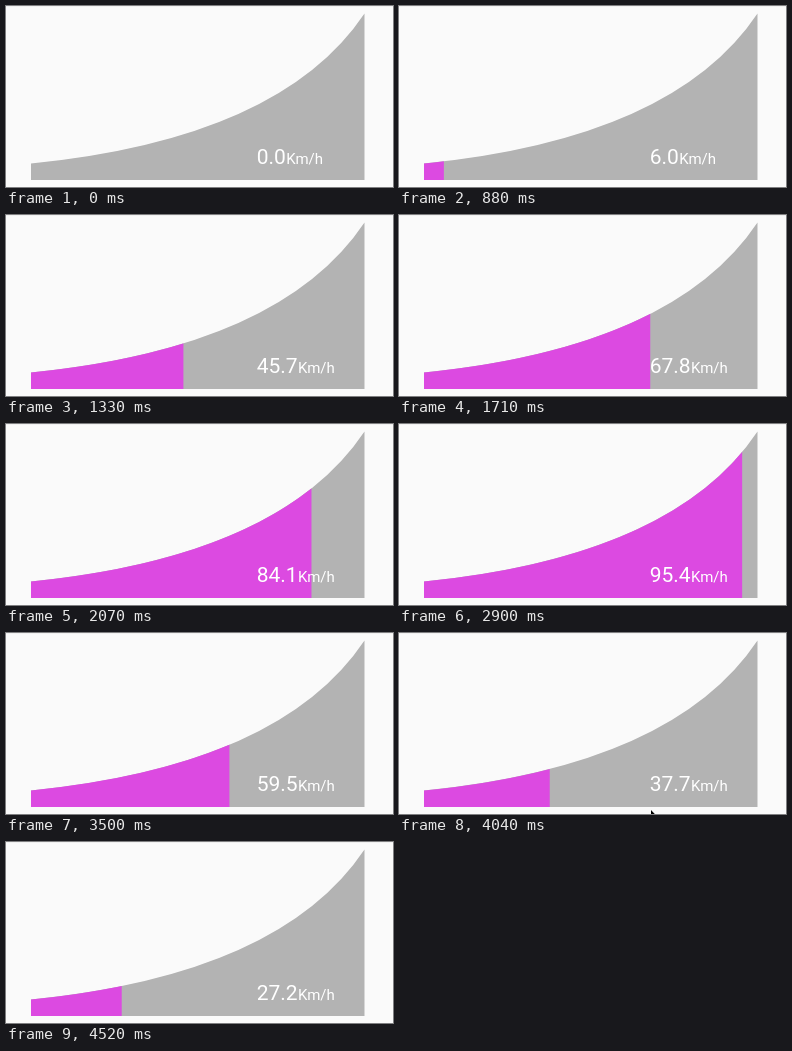
These frames come from a looping animation (387x181 px, 4.56 s). An HTML page with a canvas:

```html
<!DOCTYPE html>
<html lang="en">
<head>
<meta charset="utf-8">
<title>Speed gauge</title>
<style>
  html, body { margin: 0; width: 100%; height: 100%; overflow: hidden; background: #fafafa; }
  canvas { display: block; }
</style>
</head>
<body>
<canvas id="stage" width="387" height="181"></canvas>
<script>
const ctx = document.getElementById('stage').getContext('2d');
const LOOP = 4560;
const LEFT = 25, RIGHT = 358.5, BOTTOM = 174;

// Speed over time: [ms, km/h]
const KEYS = [
  [820, 0], [1080, 25.4], [1330, 45.7], [1950, 79.9], [2070, 84.1], [2370, 91.4],
  [2900, 95.4], [3020, 89.7], [3500, 59.5], [4040, 37.7], [4520, 27.2]
];

// Bursts of display updates: [first, last, count]
const BURSTS = [
  [880, 1390, 10], [1450, 1950, 9], [2010, 2370, 7], [2530, 3020, 9],
  [3080, 3560, 9], [3620, 4100, 9], [4160, 4520, 7]
];
const TICKS = BURSTS.flatMap(([a, b, n]) =>
  Array.from({ length: n }, (_, i) => Math.round((a + (b - a) * i / (n - 1)) / 10) * 10));

const slopes = KEYS.slice(1).map(([t, v], i) => (v - KEYS[i][1]) / (t - KEYS[i][0]));
const tangents = KEYS.map((_, i) => {
  if (i === 0) return slopes[0];
  if (i === slopes.length) return slopes[i - 1];
  const a = slopes[i - 1], b = slopes[i];
  return a * b > 0 ? 2 * a * b / (a + b) : 0;
});

// Monotone cubic interpolation between the keys
function speedAt(t) {
  if (t <= KEYS[0][0]) return 0;
  let i = 0;
  while (i < KEYS.length - 2 && t > KEYS[i + 1][0]) i++;
  const [t0, v0] = KEYS[i], [t1, v1] = KEYS[i + 1];
  const h = t1 - t0, u = (t - t0) / h, w = 1 - u;
  return v0 * (1 + 2 * u) * w * w + v1 * u * u * (3 - 2 * u)
    + h * u * w * (tangents[i] * w - tangents[i + 1] * u);
}

const ramp = new Path2D();
ramp.moveTo(LEFT, BOTTOM);
ramp.lineTo(LEFT, 157.5);
ramp.quadraticCurveTo(275, 132.5, RIGHT, 7.5);
ramp.lineTo(RIGHT, BOTTOM);
ramp.closePath();

const arrow = new Path2D('M0 0V13L3 10L5 15L7 14L5 9.5H9Z');

function drawRamp(speed) {
  ctx.fillStyle = '#b3b3b3';
  ctx.fill(ramp);
  if (speed <= 0) return;
  ctx.save();
  ctx.beginPath();
  ctx.rect(0, 0, LEFT + (RIGHT - LEFT) * speed / 100, 181);
  ctx.clip();
  ctx.fillStyle = '#dc4ae1';
  ctx.fill(ramp);
  ctx.restore();
}

function drawLabel(speed) {
  const digits = speed.toFixed(1);
  ctx.fillStyle = '#fff';
  ctx.font = '21px Roboto, sans-serif';
  ctx.fillText(digits, 250.7, 158);
  const x = 251 + ctx.measureText(digits).width;
  ctx.font = '15px Roboto, sans-serif';
  ctx.fillText('Km/h', x, 158);
}

function drawPointer(t) {
  if (t < 4040 || t >= 4280) return;
  ctx.save();
  ctx.translate(252 + (t - 4040) * 0.35, 177);
  ctx.strokeStyle = '#fff';
  ctx.lineWidth = 1;
  ctx.stroke(arrow);
  ctx.fillStyle = '#000';
  ctx.fill(arrow);
  ctx.restore();
}

function draw(now) {
  const t = now % LOOP;
  const tick = TICKS.reduce((last, s) => (s <= t ? s : last), 0);
  const speed = speedAt(tick);
  ctx.fillStyle = '#fafafa';
  ctx.fillRect(0, 0, 387, 181);
  ctx.fillStyle = '#f0f0f0';
  ctx.fillRect(0, 0, 387, 1);
  drawRamp(speed);
  drawLabel(speed);
  drawPointer(tick);
}

let start;
function frame(now) {
  start ??= now;
  draw(now - start);
  requestAnimationFrame(frame);
}
draw(0);
requestAnimationFrame(frame);
</script>
</body>
</html>
```
